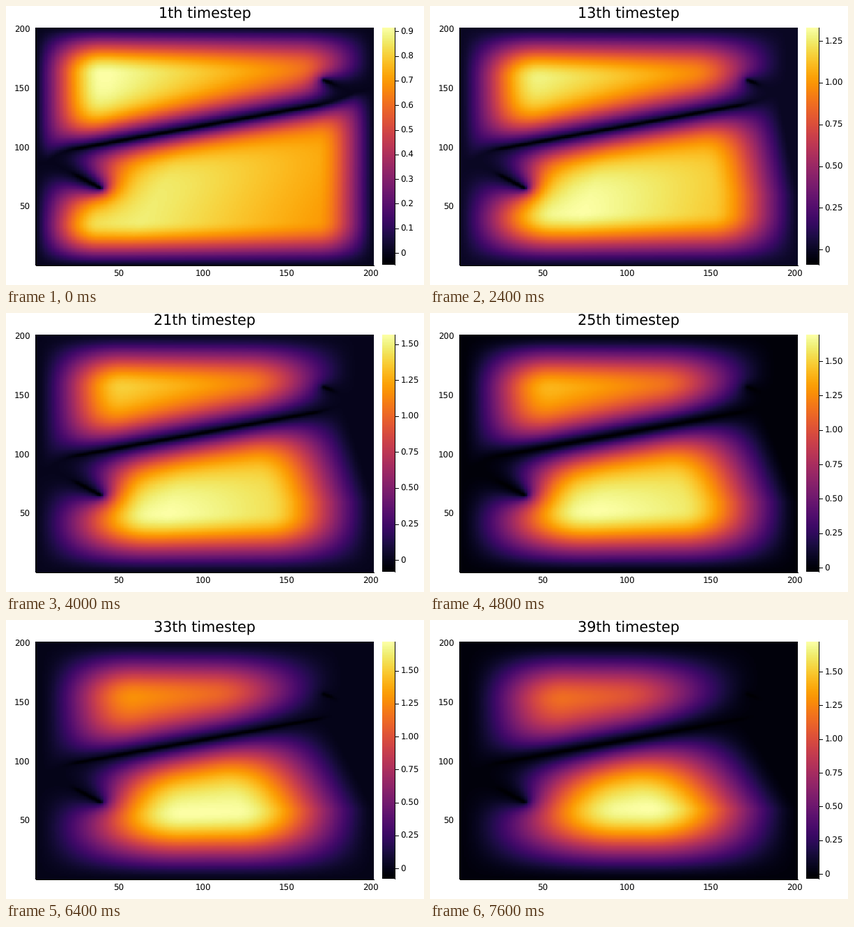
A matplotlib script that plays this animation: 600 by 400 pixels, repeating every 7800 ms.

```python
import numpy as np
import matplotlib.pyplot as plt
from matplotlib.animation import FuncAnimation

STEPS = 39
LEFT, RIGHT, TOP, BOTTOM = 42, 527.5, 31, 372
BAR_X0, BAR_X1 = 540, 558
TICK_PT, TITLE_PT = 8.53, 14.93

plt.rcParams["font.family"] = "DejaVu Sans"
plt.rcParams["text.hinting"] = "none"

# Keyed time steps: colour range and the height of each lobe relative to it
KEYS = [1, 9, 17, 25, 28, 33, 39]
V_MIN = [-0.048, -0.0485, -0.134, -0.030, -0.053, -0.079, -0.036]
V_MAX = [0.915, 1.22, 1.44, 1.693, 1.743, 1.72, 1.723]
UPPER = [1.0, 0.99, 0.925, 0.83, 0.78, 0.745, 0.67]
LOWER = [0.95, 1, 1, 1, 1, 1, 1]

x, y = np.meshgrid(np.arange(1, 202), np.arange(201, 0, -1))


def rise(d, width, power=2):
    """Ramp from 0 at d = 0 to 1 at d = width."""
    return np.sin(np.pi / 2 * np.clip(d / width, 0, 1)) ** power


def away(d, width, power):
    return 1 - np.exp(-(np.abs(d) / width) ** power)


def slit(tip, heading):
    """Slit ending at tip: distance ahead, sideways offset and radius + ahead."""
    ux, uy = np.array(heading) / np.hypot(*heading)
    dx, dy = x - tip[0], y - tip[1]
    ahead = dx * ux + dy * uy
    reach = np.maximum(np.hypot(dx, dy) + ahead, 0)
    return ahead, dx * uy - dy * ux, reach


# Z-shaped zero curve: a long slanted line with a hook at either end
line = (99 + 0.2575 * (x - 24.3)
        + 5 * np.clip((x - 165) / 25, 0, 1) ** 2
        - 6 * np.clip((24 - x) / 16, 0, 1) ** 2)
gap = 0.97 * (y - line)
ahead_l, side_l, reach_l = slit((39.7, 65.5), (31.1, -23.5))
ahead_r, side_r, reach_r = slit((171.5, 157.5), (-0.84, 0.54))
hook_l = away(reach_l, 11, 0.8)
hook_r = away(reach_r, 6, 0.8)

valley = np.exp(-(gap / 1.5) ** 2) * rise(x - 15, 15) * rise(178 - x, 15)
for ahead, side, length in ((ahead_l, side_l, 25), (ahead_r, side_r, 12)):
    along = rise(ahead + length, 10) * rise(2 - ahead, 3)
    valley = np.maximum(valley, np.exp(-(side / 1.5) ** 2) * along)


def upper_lobe(s):
    p = 1.2 + 0.6 * s
    fade = 1 - (0.0022 - 0.0012 * s) * np.maximum(x - 45 - 20 * s, 0)
    return (rise(x - 0.5 - 3 * s, 40 + 20 * s, p)
            * rise(201.5 - 20 * s - x, 44 + 40 * s, p)
            * rise(201.5 - y, 40 + 12 * s, p)
            * away(gap, 16 + 5 * s, 1.4) * hook_r * fade)


def lower_lobe(s):
    p = 1.2 + 0.4 * s
    run = x - 0.4 * (1 - s) * (y - 40) - 65 - 25 * s
    fade = 1 - 0.0019 * (1 - s ** 3) * np.maximum(run, 0)
    lean = 30 * s * np.maximum(y - 60, 0) / 70
    return (rise(x - 0.5, 38 + 57 * s, p)
            * rise(201.5 - lean - x, 34 + 56 * s, p)
            * rise(y - 0.5, 38 + 25 * s, p)
            * away(gap, 13 + 11 * s, 1.3) * hook_l * fade)


def key(step, values):
    return np.interp(step, KEYS, values)


def field(step):
    s = (step - 1) / (STEPS - 1)
    above = gap > 0
    up = np.where(above, upper_lobe(s), 0)
    low = np.where(above, 0, lower_lobe(s))
    u = key(step, UPPER) * up / up.max() + key(step, LOWER) * low / low.max()
    return key(step, V_MAX) * u + 0.9 * key(step, V_MIN) * valley


fig = plt.figure(figsize=(6, 4), dpi=100, facecolor="white")
ax = fig.add_axes([0, 0, 1, 1])
ax.axis("off")

heat = ax.imshow(field(1), cmap="inferno", interpolation="nearest",
                 aspect="auto", extent=(LEFT, RIGHT, BOTTOM, TOP))
ax.imshow(np.linspace(1, 0, 256)[:, None], cmap="inferno", aspect="auto",
          extent=(BAR_X0, BAR_X1, 371, TOP))
ax.set_xlim(0, 600)
ax.set_ylim(400, 0)


def label(px, py, text, ha):
    return ax.text(px, py + 4.3, text, fontsize=TICK_PT, ha=ha, va="baseline")


ax.plot([42.5, 42.5, 527.5], [TOP, 371.5, 371.5], color="black", lw=0.72)
ax.plot([BAR_X1, BAR_X1], [TOP, 371], color="black", lw=0.72)
for v in (50, 100, 150, 200):
    label(42.5 + (v - 0.5) * 485 / 201, 383.2, str(v), "center")
    label(34.5, 372 - (v - 0.5) * 341 / 201, str(v), "right")

title = ax.text(285, 18, "", fontsize=TITLE_PT, ha="center", va="baseline")
marks = [ax.plot([], [], color="black", lw=0.72)[0] for _ in range(11)]
names = [label(566.5, 0, "", "left") for _ in marks]


def update(i):
    step = i + 1
    lo, hi = key(step, V_MIN), key(step, V_MAX)
    heat.set_data(field(step))
    heat.set_clim(lo, hi)
    title.set_text(f"{step}th timestep")

    tick, digits = (0.1, 1) if hi < 1 else (0.25, 2)
    for n, (mark, name) in enumerate(zip(marks, names)):
        v = n * tick
        shown = v <= hi
        mark.set_visible(shown)
        name.set_visible(shown)
        py = 371 - 340 * (v - lo) / (hi - lo)
        mark.set_data([BAR_X1, BAR_X1 + 5], [py, py])
        name.set_y(py + 4.3)
        name.set_text(f"{v:.{digits}f}" if n else "0")
    return [heat, title, *marks, *names]


anim = FuncAnimation(fig, update, frames=STEPS, interval=200, repeat=True)
plt.show()
```
